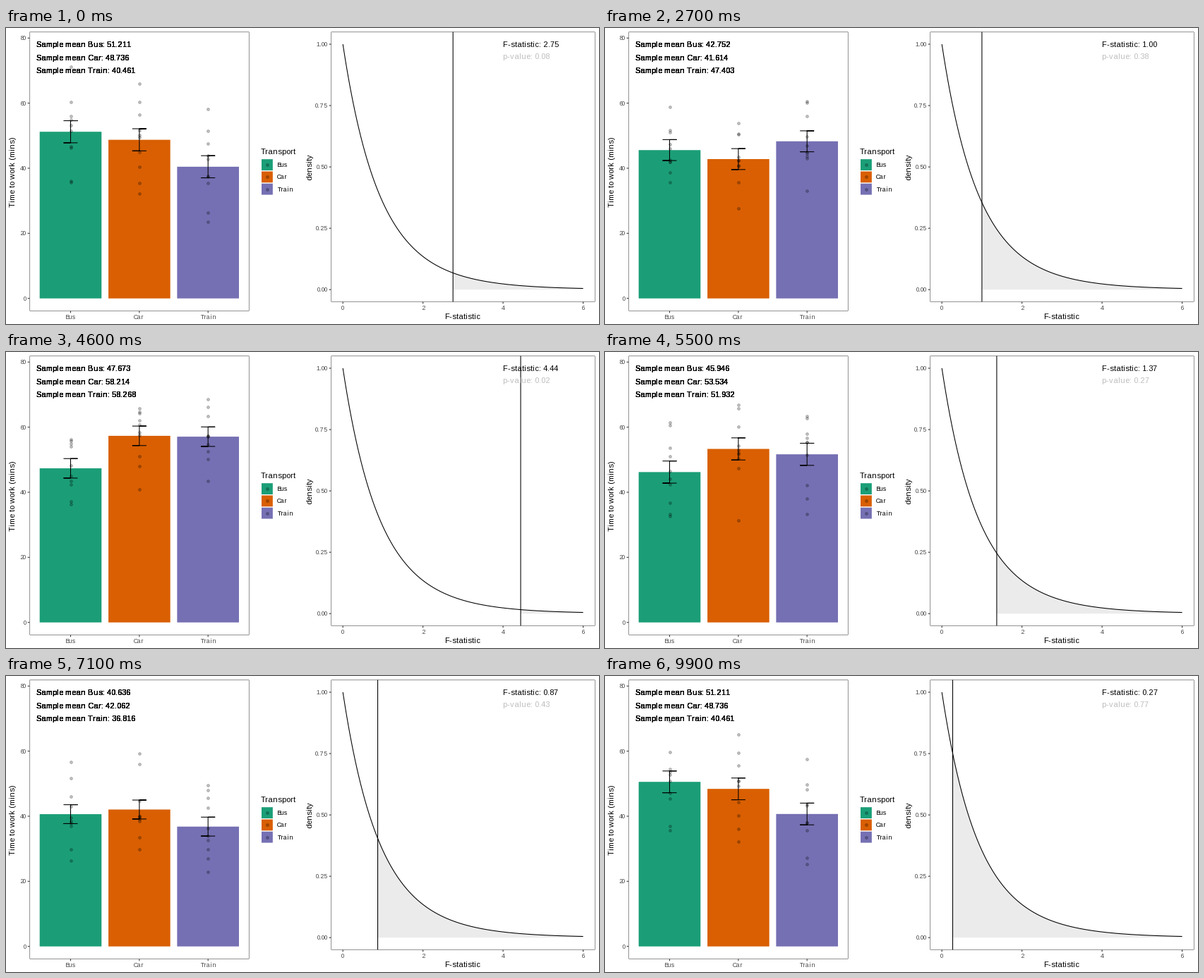
Animation, 840 px wide and 420 px high, one loop 10 s. Source, as a matplotlib script:

```python
import numpy as np
import matplotlib.pyplot as plt
from matplotlib.animation import FuncAnimation
from matplotlib.patches import Rectangle

W, H, DPI = 840, 420, 100
PX = 72 / DPI
FRAMES, STEP = 100, 100
SIZE = 10
GROUPS = ["Bus", "Car", "Train"]
FILLS = ["#1B9E77", "#D95F02", "#7570B3"]
CENTERS = [91.5, 188.9, 286.2]
BAR_W = 87.6
STROKE = 1.07

plt.rcParams["font.family"] = "Liberation Sans"
plt.rcParams["text.hinting_factor"] = 1
plt.rcParams["path.snap"] = False

# Group means and F statistic of each sample
STATS = np.array([
    [51.211, 48.736, 40.461, 2.75],
    [37.432, 49.930, 43.596, 4.24],
    [42.752, 41.614, 47.403, 1.00],
    [50.009, 44.692, 49.647, 0.74],
    [47.673, 58.214, 58.268, 4.44],
    [45.946, 53.534, 51.932, 1.37],
    [51.012, 49.027, 46.318, 0.62],
    [40.636, 42.062, 36.816, 0.87],
    [41.759, 44.453, 34.821, 2.18],
    [41.543, 43.786, 43.905, 0.27]])
MEANS, F_STATS = STATS[:, :3], STATS[:, 3]

# F = SIZE * var(means) / var(within), so the common error follows from F
ERRORS = np.sqrt(MEANS.var(axis=1, ddof=1) / F_STATS)


def draw_samples(seed=4):
    """Normal samples scaled to the exact mean and standard error."""
    z = np.random.default_rng(seed).normal(size=(len(MEANS), 3, SIZE))
    z -= z.mean(axis=2, keepdims=True)
    z /= z.std(axis=2, ddof=1, keepdims=True)
    return MEANS[:, :, None] + z * ERRORS[:, None, None] * SIZE ** 0.5


SAMPLES = draw_samples()


# Scales from data to pixels
def time_y(v):
    return 383.7 - 4.618 * v


def stat_x(v):
    return 477.2 + 56.72 * v


def dens_y(v):
    return 371.2 - 348.2 * v


# F distribution with 2 and 27 degrees of freedom
def density(x):
    return (1 + 2 * x / 27) ** -14.5


def p_value(f):
    return (1 + 2 * f / 27) ** -13.5


def ease(t):
    return (1 - np.cos(np.pi * t)) / 2


fig = plt.figure(figsize=(W / DPI, H / DPI), dpi=DPI, facecolor="white")
ax = fig.add_axes([0, 0, 1, 1])
ax.set_xlim(0, W)
ax.set_ylim(H, 0)
ax.axis("off")


def label(x, y, s, size=11, color="black", **kw):
    return ax.text(x, y, s, fontsize=size * PX, color=color,
                   va="baseline", **kw)


def line(xs, ys, color="black", z=3):
    return ax.plot(xs, ys, color=color, lw=STROKE * PX, zorder=z,
                   solid_capstyle="butt", solid_joinstyle="miter")[0]


def dots(xs, ys):
    return ax.scatter(xs, ys, s=(3.9 * PX) ** 2, facecolor=(0, 0, 0, 0.25),
                      edgecolor=(0, 0, 0, 0.25), linewidth=0.75 * PX, zorder=3)


def panel(x0, y0, x1, y1):
    """Frame whose outer half is clipped away."""
    half = STROKE / 2
    ax.add_patch(Rectangle((x0 + half / 2, y0 + half / 2),
                           x1 - x0 - half, y1 - y0 - half, fill=False,
                           ec="#333333", lw=half * PX, zorder=6))


def tick_left(edge, y, s):
    line([edge - 2.8, edge], [y, y], "#333333")
    label(edge - 5, y + 3.1, s, 8.8, "#4D4D4D", ha="right")


def tick_below(x, edge, s):
    line([x, x], [edge, edge + 2.8], "#333333")
    label(x, edge + 11.4, s, 8.8, "#4D4D4D", ha="center")


def side_title(x, y, s):
    label(x, y, s, rotation=90, rotation_mode="anchor", ha="center")


# Bar chart
panel(33.5, 5.5, 344.5, 401.5)
for v in range(0, 81, 20):
    tick_left(33.5, time_y(v), str(v))
for x, name in zip(CENTERS, GROUPS):
    tick_below(x, 401.5, name)
side_title(13, 203.5, "Time to work (mins)")

bars = [ax.add_patch(Rectangle((x - BAR_W / 2, time_y(0)), BAR_W, 0,
                               fc=c, lw=0, zorder=2))
        for x, c in zip(CENTERS, FILLS)]
points = dots(np.repeat(CENTERS, SIZE), np.zeros(3 * SIZE))
whiskers = [line([], [], z=4) for _ in GROUPS]
# Stacked copies give the heavy look of the overprinted labels
means_text = [[label(43, y, "", zorder=7) for _ in range(6)]
              for y in (27, 46, 64)]

# Legend
label(361, 179, "Transport")
for n, (name, c) in enumerate(zip(GROUPS, FILLS)):
    y = 194.1 + 17.28 * n
    ax.add_patch(Rectangle((362, y - 7.93), 15.86, 15.86, fc=c, lw=0, zorder=2))
    dots([369.9], [y])
    label(384, y + 3.1, name, 8.8)

# Density chart
panel(460.5, 5.5, 834.5, 388.5)
for v in np.linspace(0, 1, 5):
    tick_left(460.5, dens_y(v), f"{v:.2f}")
for v in range(0, 7, 2):
    tick_below(stat_x(v), 388.5, str(v))
side_title(433, 197.5, "density")
label(647, 413, "F-statistic", ha="center")

grid = np.linspace(0, 6, 121)
line(stat_x(grid), dens_y(density(grid)))
tail = ax.fill([0, 0], [0, 0], color="#EBEBEB", lw=0, zorder=1)[0]
marker = line([], [], z=4)
f_text = label(704, 27, "", zorder=7)
p_text = label(704, 44, "", color="#BEBEBE", zorder=7)


def phase(frame):
    """Current sample and the linear progress towards the next one."""
    i = max(0, (frame - 1) // 10)
    start = 10 * i + 4 if i else 3
    end = min(10 * i + 11, FRAMES)
    return i, min(max((frame - start) / (end - start), 0), 1)


def update_bars(frame):
    i, t = phase(frame)
    j, k = (i + 1) % len(MEANS), ease(t)

    def mix(table):
        return (1 - k) * table[i] + k * table[j]

    points.set_offsets(np.column_stack(
        [np.repeat(CENTERS, SIZE), time_y(mix(SAMPLES)).ravel()]))
    e, named = mix(ERRORS), MEANS[j if t >= 0.5 else i]
    for g, m in enumerate(mix(MEANS)):
        x, top, low = CENTERS[g], time_y(m + e), time_y(m - e)
        bars[g].set_height(time_y(m) - time_y(0))
        whiskers[g].set_data([x - 10, x + 10, x, x, x - 10, x + 10],
                             [top, top, top, low, low, low])
        for copy in means_text[g]:
            copy.set_text(f"Sample mean {GROUPS[g]}: {named[g]:.3f}")


def update_density(frame):
    f = F_STATS[frame // 10]
    xs = np.linspace(f, 6, 80)
    tail.set_xy(np.column_stack(
        [stat_x(np.r_[f, xs, 6]), dens_y(np.r_[0, density(xs), 0])]))
    marker.set_data([stat_x(f)] * 2, [5.5, 388.5])
    f_text.set_text(f"F-statistic: {f:.2f}")
    p_text.set_text(f"p-value: {p_value(f):.2f}")


def update(frame):
    update_bars(frame)
    update_density(frame)
    return []


anim = FuncAnimation(fig, update, frames=FRAMES, interval=STEP,
                     repeat=True, repeat_delay=0, blit=False)
plt.show()
```
